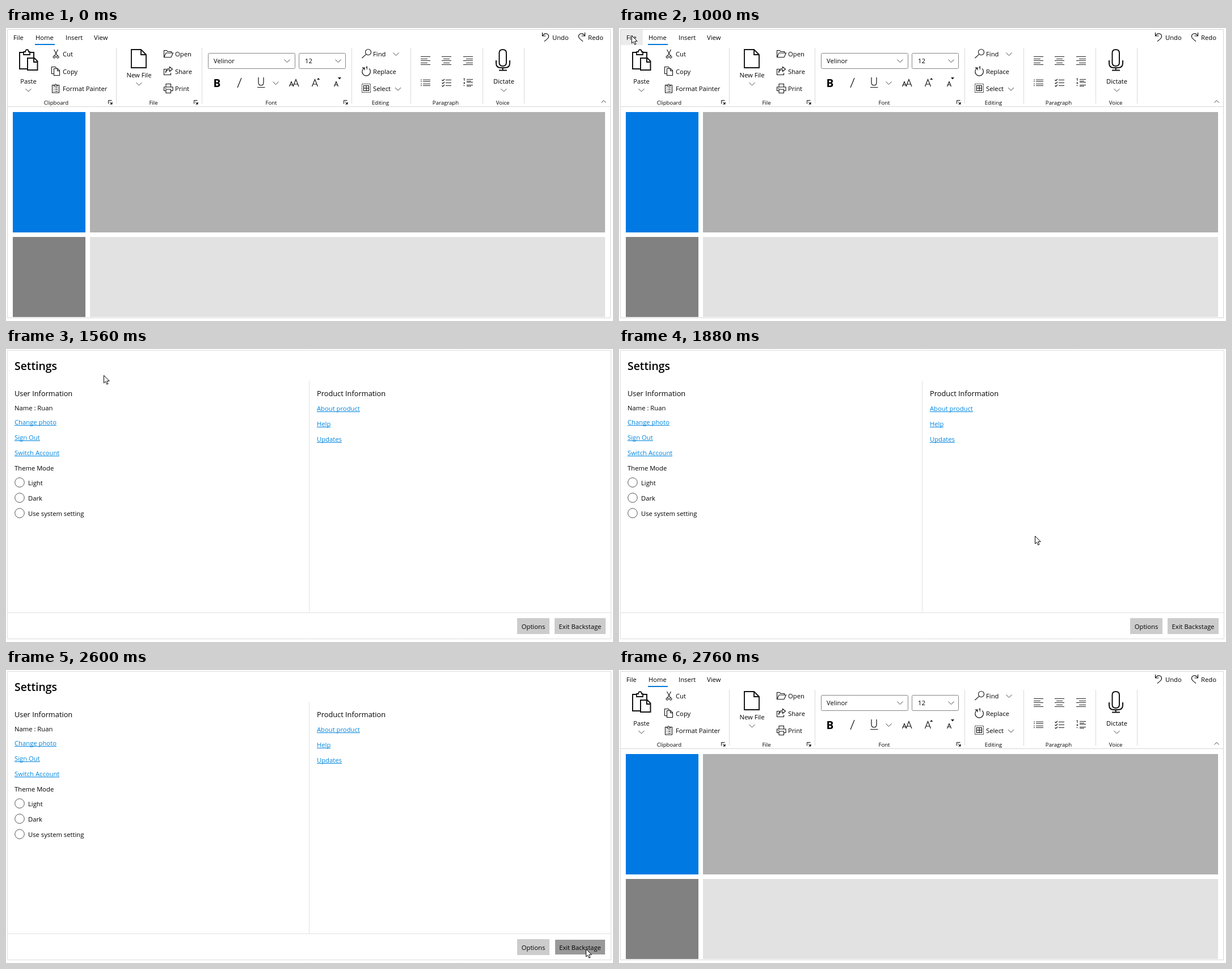
These frames come from a looping animation (1070 by 516 pixels, 3 s). An HTML page with a canvas:

```html
<!DOCTYPE html>
<html lang="en">
<head>
<meta charset="utf-8">
<title>Ribbon backstage</title>
<style>
html, body { margin: 0; width: 100%; height: 100%; overflow: hidden; background: #fff; }
canvas { display: block; }
</style>
</head>
<body>
<canvas id="stage" width="1070" height="516"></canvas>
<script>
const ctx = document.getElementById('stage').getContext('2d');
const LOOP = 3000, STEP = 40;
const BACKSTAGE_IN = 1080, BACKSTAGE_OUT = 2640, PRESS = 2520;
const INK = '#111', LINK = '#0086df', RULE = '#d6d6d6';

// time, x, y, speed x, speed y (px per ms)
const MOVES = [
  [480, 0, 0, .06, .04],
  [860, 22, 13, 0, 0],
  [1120, 22, 13, 0, 0],
  [1560, 172, 46, .68, .16],
  [2120, 1031, 497, 0, 0],
  [2240, 1031, 497, 0, 0],
  [2600, 1022, 491, -.05, 0],
  [2720, 1012, 499, -.08, .08]
];

function pointer(t) {
  if (t < MOVES[0][0] || t >= 2760) return null;
  const i = MOVES.findIndex(m => m[0] > t);
  if (i < 0) return MOVES[MOVES.length - 1].slice(1, 3);
  const a = MOVES[i - 1], b = MOVES[i], d = b[0] - a[0], u = (t - a[0]) / d;
  const k = u * u * (3 - 2 * u);
  return [1, 2].map(n => Math.round(a[n] + (b[n] - a[n]) * k
    + d * u * (1 - u) * (a[n + 2] * (1 - u) - b[n + 2] * u)));
}

function rect(x, y, w, h, color) {
  ctx.fillStyle = color;
  ctx.fillRect(x, y, w, h);
}

function frame(x, y, w, h, color, r = 0) {
  ctx.strokeStyle = color;
  ctx.lineWidth = 1;
  ctx.beginPath();
  ctx.roundRect(x + .5, y + .5, w - 1, h - 1, r);
  ctx.stroke();
}

function text(s, x, y, size = 11.25, align = 'left', color = '#000', weight = 400) {
  ctx.font = `${weight} ${size}px "Open Sans", "Noto Sans", sans-serif`;
  ctx.textAlign = align;
  ctx.fillStyle = color;
  ctx.fillText(s, x, y);
  return ctx.measureText(s).width;
}

function icon(x, y, d, width = 1.1, fill = null, color = INK) {
  const path = new Path2D(d);
  ctx.save();
  ctx.translate(x, y);
  if (fill) {
    ctx.fillStyle = fill;
    ctx.fill(path);
  }
  if (width) {
    ctx.strokeStyle = color;
    ctx.lineWidth = width;
    ctx.stroke(path);
  }
  ctx.restore();
}

const chevron = (x, y, w = 5) => icon(x, y, `M${-w} -2.5L0 2.5L${w} -2.5`, 1, null, '#444');

function launcher(x) {
  icon(x, 127, 'M.5 6.5V.5H6.5M2.5 2.5L6 6', 1);
  icon(x, 127, 'M7.5 3V7.5H3Z', 0, INK);
}

// rows: pairs of start and end offsets
function rows(x, ys, spans) {
  ys.forEach((y, i) => {
    const [a, b] = spans[i % spans.length];
    rect(x + a, y, b - a, 1, '#222');
  });
}

function clipboardGroup() {
  icon(23, 37, 'M9 6H1V35H14M18 6H26V15', 2);
  icon(23, 37, 'M8 10V5H11C11 0 17 0 17 5H19V10Z', 1.8, '#fff');
  icon(23, 37, 'M15 16H27L32.5 21.5V37H15ZM26 16V23H32', 2, '#fff');
  text('Paste', 39.5, 98, 11.25, 'center');
  chevron(39.5, 109.5);

  icon(83, 38, 'M1.5 0L8 11.5M8.5 0L2.5 11.5');
  icon(83, 38, 'M4 13A1.9 2 0 1 1 .2 13A1.9 2 0 1 1 4 13M10 13A1.9 2 0 1 1 6.2 13A1.9 2 0 1 1 10 13');
  text('Cut', 100, 50);
  icon(80, 68, 'M4 12.5H.5V.5H7L9 2.5M4.5 3.5H11L14.5 7V15.5H4.5ZM10.5 3.5V7.5H14.5');
  text('Copy', 100, 81);
  icon(81, 98, 'M3.5 2.5H.5V16H12.5V2.5H9.5M3.5 4.5V2.5H5Q6.5 -1 8 2.5H9.5V4.5Z');
  icon(81, 98, 'M3 7.5H4M5.5 7.5H10M3 10.5H4M5.5 10.5H10M3 13.5H4M5.5 13.5H10', 1);
  text('Format Painter', 100, 111);
  launcher(180);
}

function fileGroup() {
  icon(220, 37, 'M1 1H18L27 10V33H1ZM18 1V10H27', 1.9);
  text('New File', 234.5, 87, 11.25, 'center');
  chevron(234.5, 98.5);
  icon(278, 39, 'M.5 12.5V.5H5L7 2.5H13.5V5M.5 12.5L4 5H16.5L13 12.5Z');
  text('Open', 298, 50);
  icon(278, 68, 'M5 4.5H.5V14.5H12.5V11M3.5 11Q4 5.5 10.5 5.5V8.5L15.5 4.5L10.5 .5V3Q3.5 3.5 3.5 11Z');
  text('Share', 298, 81);
  icon(278, 98, 'M4 6V.5H12.5V6M4 12.5H.5V6H16V12.5H12.5M4 10H12.5V16.5H4ZM2.5 8.5H4');
  text('Print', 298, 111);
  launcher(331);
}

function fontGroup() {
  frame(356, 44, 154, 28, '#858585', 2);
  text('Velinor', 366, 62);
  chevron(495.5, 58);
  frame(516, 44, 83, 28, '#858585', 2);
  text('12', 527, 62);
  chevron(585.5, 58);
  text('B', 372, 104, 19, 'center', '#000', 700);
  icon(407, 88, 'M8 0L1 17', 1.2);
  icon(443, 87, 'M2 0V9Q2 14 6.5 14Q11 14 11 9V0M0 17.5H13.5', 1.2);
  chevron(475.5, 97);
  icon(499, 90, 'M.5 13L4 4.5L7.5 13M1.7 10H6.3M7 13L12 .5L17 13M8.7 9H15.3', 1.2);
  icon(539, 90, 'M.5 13L5.5 .5L10.5 13M2.2 9H8.8', 1.2);
  icon(548, 88, 'M0 3L2.7 0L5.4 3Z', 0, INK);
  icon(578, 94, 'M.5 9L4 .5L7.5 9M1.8 6H6.2', 1.2);
  icon(585, 87, 'M0 0H6L3 3.4Z', 0, INK);
  launcher(595);
}

function editingGroup() {
  icon(627, 37, 'M16.5 5.5A5 5 0 1 1 6.5 5.5A5 5 0 1 1 16.5 5.5M8 9.2L.5 16');
  text('Find', 647, 50);
  chevron(687.5, 46);
  icon(627, 68, 'M4.5 2.5A7.3 7.3 0 1 0 13 3.4M.8 2.2H5V6.3', 1.2);
  icon(627, 68, 'M7.5 1.5L9.3 .2V5', 1.1);
  text('Replace', 647, 81);
  ctx.setLineDash([2, 1]);
  icon(627, 98, 'M.5 .5H15.5V15.5H.5Z', 1);
  ctx.setLineDash([]);
  icon(627, 98, 'M3.5 3.5H12.5V12.5H3.5ZM8 3.5V12.5M3.5 8H12.5', 1.2);
  text('Select', 647, 111);
  chevron(691, 107.5);
}

function paragraphGroup() {
  const lines = [50, 54, 57, 61, 64], list = [91, 94, 98, 101];
  rows(731, lines, [[0, 17], [0, 12]]);
  rows(768, lines, [[0, 17], [3, 14]]);
  rows(806, lines, [[0, 17], [5, 17]]);
  rows(731, list, [[0, 2]]);
  rows(731, list, [[4, 17]]);
  rows(768, [91, 96, 101], [[7, 17]]);
  for (const y of [90, 95, 100]) icon(768, y, 'M.5 1.5L2 3L5 0', 1.1);
  rows(806, [90, 95, 100], [[6, 17]]);
  icon(806, 88, 'M.5 2L2 .5V5M.5 8H2.5V10H.5M.5 13.5H2.5', 1);
  rows(812, [93, 102], [[0, 8]]);
}

function voiceGroup() {
  icon(862, 37, 'M7.5 7Q7.5 1 13.5 1Q20 1 20 7V24Q20 30 13.5 30Q7.5 30 7.5 24Z', 2);
  icon(862, 37, 'M2 20V25Q2 33 10 33H17.5Q26 33 26 25V20M13.7 33V37M7 37.5H21', 2);
  text('Dictate', 877.5, 98, 11.25, 'center');
  chevron(877.5, 109.5);
}

function ribbon(p) {
  if (p && p[0] >= 3 && p[0] < 42 && p[1] >= 3 && p[1] < 30) rect(3, 3, 39, 27, '#ebebeb');
  [['File', 13], ['Home', 52], ['Insert', 105], ['View', 155]].forEach(([s, x]) => text(s, x, 21));
  rect(51, 28, 35, 2, '#0078d4');
  const turn = 'M1.5 0V6H7.5M1.7 5.8Q5 1 9 2Q14 4 12 9Q10 12 5 15.5';
  icon(944, 8, turn, 1.2);
  text('Undo', 963, 21);
  ctx.save();
  ctx.translate(1022, 8);
  ctx.scale(-1, 1);
  icon(0, 0, turn, 1.2);
  ctx.restore();
  text('Redo', 1026, 21);

  clipboardGroup();
  fileGroup();
  fontGroup();
  editingGroup();
  paragraphGroup();
  voiceGroup();
  [['Clipboard', 88.5], ['File', 260], ['Font', 467.5], ['Editing', 660],
    ['Paragraph', 775], ['Voice', 875.5]].forEach(([s, x]) => text(s, x, 135, 9.6, 'center'));
  for (const x of [194, 345, 609, 713, 840, 913]) rect(x, 35, 1, 98, '#d9d9d9');
  icon(1053.5, 129.5, 'M-4 2L0 -2L4 2', 1, null, '#444');

  rect(3, 138, 1062, 1, RULE);
  rect(12, 148, 128, 212, '#0079e3');
  rect(148, 148, 908, 212, '#b1b1b1');
  rect(12, 368, 128, 141, '#818181');
  rect(148, 368, 908, 141, '#e2e2e2');
  frame(2, 2, 1064, 509, RULE);
}

function link(s, x, y) {
  const w = text(s, x, y, 11.25, 'left', LINK);
  rect(x, y + 1, Math.round(w), 1, LINK);
}

function button(s, x, w, p, pressed) {
  const over = p && p[0] >= x && p[0] < x + w && p[1] >= 474 && p[1] < 502;
  const down = over && pressed, inset = down ? 1 : 0;
  rect(x + inset, 474 + inset, w - 2 * inset, 28 - 2 * inset, down ? '#999' : over ? '#e9e9e9' : '#ccc');
  text(s, x + w / 2, 492.5, down ? 11.05 : 11.25, 'center');
}

function backstage(p, pressed) {
  text('Settings', 15, 37, 19.4, 'left', '#000', 600);
  text('User Information', 15, 83, 12.8);
  text('Name : Ruan', 15, 108);
  ['Change photo', 'Sign Out', 'Switch Account'].forEach((s, i) => link(s, 15, 133 + 27 * i));
  text('Theme Mode', 15, 214);
  ['Light', 'Dark', 'Use system setting'].forEach((s, i) => {
    const y = 235 + 27 * i;
    ctx.strokeStyle = '#555';
    ctx.lineWidth = 1;
    ctx.beginPath();
    ctx.arc(24, y, 8.3, 0, 2 * Math.PI);
    ctx.stroke();
    text(s, 39, y + 4.5);
  });
  text('Product Information', 548, 83, 12.8);
  ['About product', 'Help', 'Updates'].forEach((s, i) => link(s, 548, 109 + 27 * i));
  rect(534, 56, 1, 408, '#e1e1e1');
  rect(3, 464, 1063, 1, '#e1e1e1');
  button('Options', 901, 57, p, false);
  button('Exit Backstage', 967, 90, p, pressed);
  frame(2, 2, 1065, 509, '#dcdcdc');
}

function draw() {
  const t = Math.floor(performance.now() % LOOP / STEP) * STEP;
  const p = pointer(t);
  rect(0, 0, 1070, 516, '#fff');
  if (t >= BACKSTAGE_IN && t < BACKSTAGE_OUT) backstage(p, t >= PRESS);
  else ribbon(p);
  if (p) icon(p[0] + .5, p[1] + .5, 'M0 0V13.5L3 10.7L5.2 15.7L7.4 14.7L5.3 9.8H9.7Z', 1, '#fff', '#000');
  requestAnimationFrame(draw);
}
draw();
</script>
</body>
</html>
```
